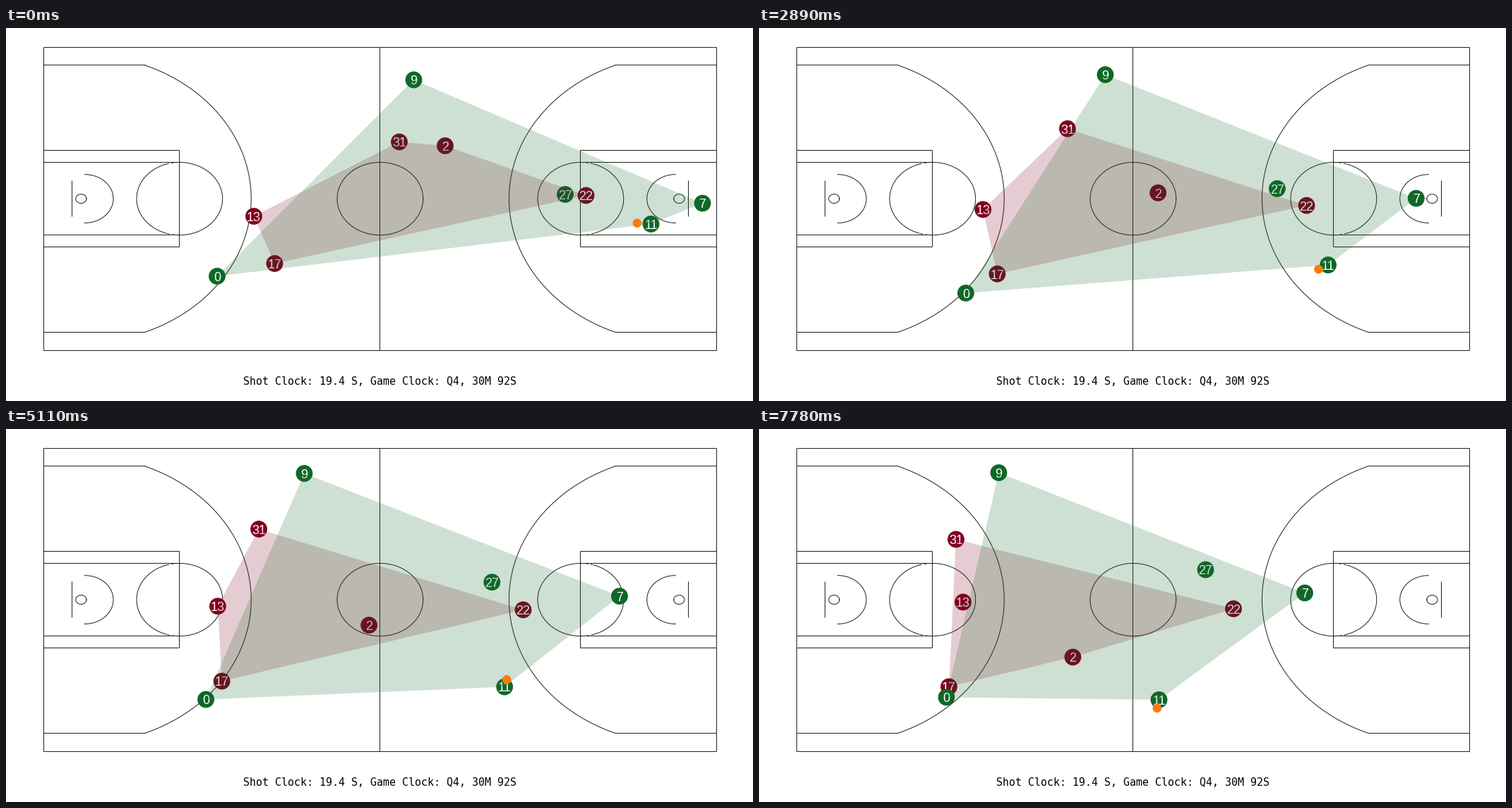
A matplotlib script for the animation above (8000 ms loop, 1058 by 529 pixels).

```python
import numpy as np
import matplotlib.pyplot as plt
from matplotlib.animation import FuncAnimation
from matplotlib.patches import Circle, Polygon

W, H, DPI = 1058, 529, 100
FRAMES, LOOP = 200, 8000
STEPS = 36  # tracking samples per loop, each held until the next
PX = 72 / DPI  # points per pixel
GREEN, MAROON, ORANGE, INK = "#0e6827", "#800020", "#ff7a0d", "#222222"

# Each player runs a smooth curve: start, halfway point, end
AWAY = {
    "31": ((557, 161.5), (400, 141), (279, 156.5)),
    "2": ((622, 167), (543, 254.5), (444.5, 323.5)),
    "22": ((821.5, 237.5), (757, 254.5), (672, 255)),
    "13": ((351, 267), (308.5, 254.5), (289, 245.5)),
    "17": ((380.5, 334), (323, 353), (269, 365.5)),
}
HOME = {
    "9": ((577.5, 73.5), (460, 64.5), (339.5, 62)),
    "27": ((792, 236), (713.5, 223.5), (632.5, 199.5)),
    "7": ((986.5, 248.5), (905, 239.5), (773, 232.5)),
    "11": ((913.5, 278), (763, 351), (566.5, 384)),
    "0": ((299, 352), (289, 380.5), (265.5, 380.5)),
}
DRIBBLER = "11"


def position(points, step):
    """Quadratic motion through three evenly timed points."""
    start, middle, end = np.array(points)
    u = step / (STEPS - 1)
    return ((1 - u) * (1 - 2 * u) * start + 4 * u * (1 - u) * middle
            + u * (2 * u - 1) * end)


def ball_position(step):
    """The ball weaves around the dribbler in a figure of eight."""
    turn = 2 * np.pi / 28.4
    offset = (-10 - 13 * np.cos(2 * turn * (step - 1.7)),
              1 + 11.5 * np.cos(turn * (step - 8)))
    return position(HOME[DRIBBLER], step) + offset


def hull(points):
    """Convex hull by the monotone chain."""
    pts = sorted(map(tuple, points))

    def half(seq):
        out = []
        for x, y in seq:
            while len(out) > 1:
                (ax, ay), (bx, by) = out[-2:]
                if (bx - ax) * (y - ay) - (by - ay) * (x - ax) > 0:
                    break
                out.pop()
            out.append((x, y))
        return out[:-1]

    return half(pts) + half(pts[::-1])


fig = plt.figure(figsize=(W / DPI, H / DPI), dpi=DPI, facecolor="white")
ax = fig.add_axes([0, 0, 1, 1])
ax.set(xlim=(0, W), ylim=(H, 0))
ax.axis("off")

# Court, measured in feet
SX, SY = 10.144, 8.6


def court_x(feet, right=False):
    return 52.6 + SX * (94 - feet if right else feet)


def court_y(feet):
    return 26.6 + SY * feet


def line(x0, y0, x1, y1, right=False):
    ax.plot([court_x(x0, right), court_x(x1, right)], [court_y(y0), court_y(y1)],
            color=INK, lw=PX, solid_capstyle="butt", zorder=1)


def box(x0, y0, x1, y1, right=False):
    for y in (y0, y1):
        line(x0, y, x1, y, right)
    for x in (x0, x1):
        line(x, y0, x, y1, right)


def arc(x, r, start=0, end=360, right=False, **style):
    if right:
        start, end = 180 - end, 180 - start
    t = np.radians(np.linspace(start, end, 200))
    ax.plot(court_x(x, right) + 0.5 + r * SX * np.cos(t),
            court_y(25) + 0.5 + r * SY * np.sin(t),
            color=INK, lw=PX, zorder=1, **style)


def half_court(right):
    corner = np.arcsin(22 / 23.75)
    for y in (3, 47):
        line(0, y, 5.25 + 23.75 * np.cos(corner), y, right)
    arc(5.25, 23.75, -np.degrees(corner), np.degrees(corner), right)
    box(0, 17, 19, 33, right)
    box(0, 19, 19, 31, right)
    arc(19, 6, -90, 90, right)
    arc(19, 6, 108, 252, right)
    for start in (90, 252):
        arc(19, 6, start, start + 18, right, dashes=(4, 3), dash_capstyle="butt")
    arc(5.75, 4, -90, 90, right)
    arc(5.25, 0.75, right=right)
    line(4, 22, 4, 28, right)


box(0, 0, 94, 50)
line(47, 0, 47, 50)
arc(47, 6)
for side in (False, True):
    half_court(side)

ax.text(529.5, 505.5, "Shot Clock: 19.4 S, Game Clock: Q4, 30M 92S",
        family="DejaVu Sans Mono", size=15.07 * PX, ha="center", va="baseline")


class Team:
    def __init__(self, players, color, layer):
        self.routes = list(players.values())
        self.dots, self.labels = [], []
        for z, number in enumerate(players, layer):
            self.dots.append(ax.add_patch(
                Circle((0, 0), 11.9, fc=color, ec="none", zorder=z)))
            self.labels.append(ax.text(
                0, 0, number, color="white", family="Liberation Sans",
                size=18 * PX, ha="center", va="baseline", zorder=z + 0.5))
        self.area = ax.add_patch(Polygon(
            [(0, 0)] * 3, fc=color, ec="none", alpha=0.2, zorder=layer + 20))

    def move(self, step):
        spots = [position(route, step) for route in self.routes]
        for (x, y), dot, label in zip(spots, self.dots, self.labels):
            dot.center = x, y
            label.set_position((x, y + 6.8))
        self.area.set_xy(hull(spots))


teams = [Team(AWAY, MAROON, 10), Team(HOME, GREEN, 20)]
ball = ax.add_patch(Circle((0, 0), 6.3, fc=ORANGE, ec="none", zorder=60))


def draw(frame):
    # The sample that is current when this frame ends
    step = ((frame + 1) * STEPS - 1) // FRAMES
    for team in teams:
        team.move(step)
    ball.center = tuple(ball_position(step))
    return []


anim = FuncAnimation(fig, draw, frames=FRAMES, interval=LOOP // FRAMES,
                     repeat=True, repeat_delay=0, blit=False)
plt.show()
```
